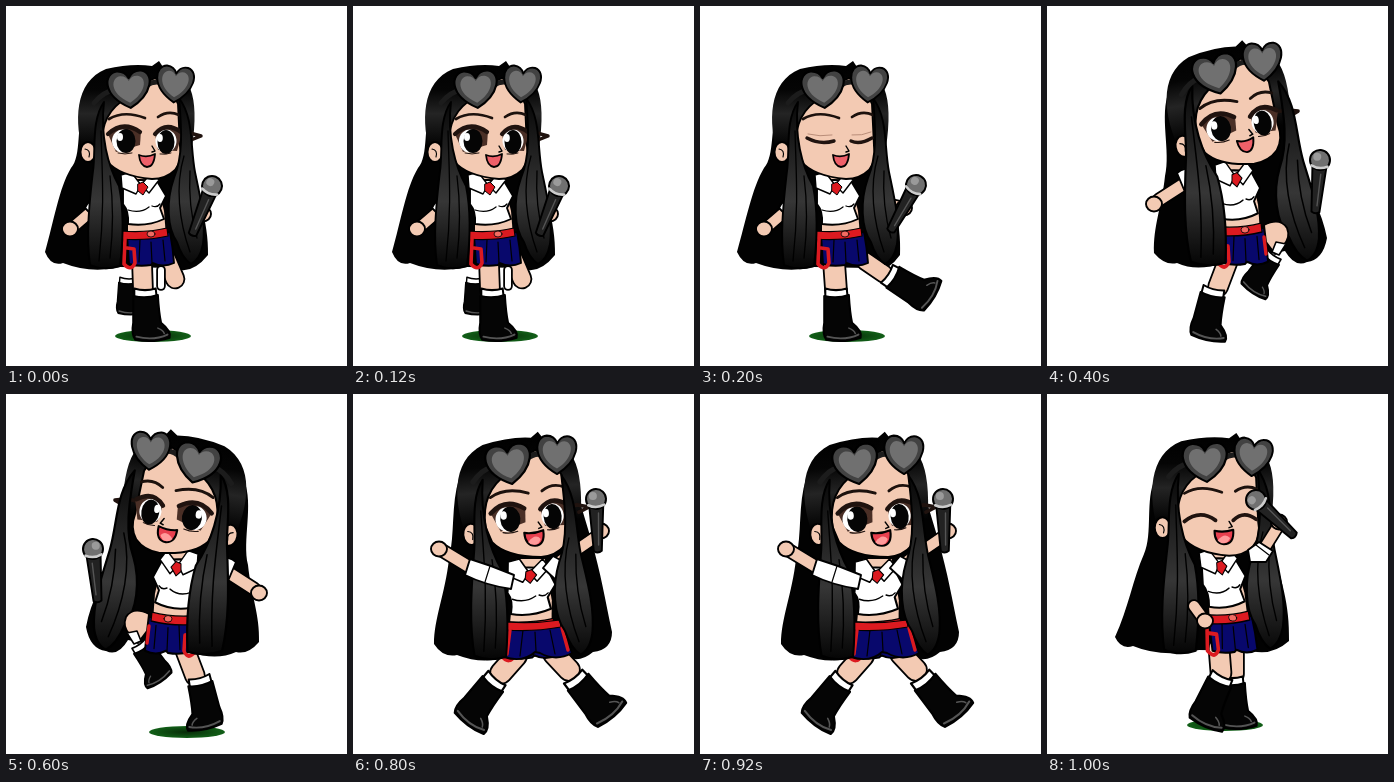
Animation of 341x360 px, one loop 1200 ms. Source, as an HTML page:

```html
<!DOCTYPE html>
<html lang="en">
<head>
<meta charset="utf-8">
<title>Singer dance loop</title>
<style>
html, body { margin: 0; width: 100%; height: 100%; overflow: hidden; background: #fff; }
svg { display: block; width: 100%; height: 100%; }
</style>
</head>
<body>
<svg id="stage" viewBox="0 0 341 360" stroke-linejoin="round" stroke-linecap="round"></svg>
<script>
const STEP = 200;
const SKIN = '#f3cab3', NAVY = '#08086c', RED = '#dc1a20', WHITE = '#fff', LASH = '#20130f';

const at = (m, s) => `<g transform="${m}">${s}</g>`;
const fill = (d, c, w = 1.9) => `<path d="${d}" fill="${c}" stroke="#000" stroke-width="${w}"/>`;
const flat = (d, c) => `<path d="${d}" fill="${c}"/>`;
const line = (d, w = 1.6, c = '#000') => `<path d="${d}" fill="none" stroke="${c}" stroke-width="${w}"/>`;
const limb = (d, w, c = SKIN) => line(d, w + 3.6) + line(d, w, c);
const disc = (x, y, rx, ry, c, w = 0) =>
  `<ellipse cx="${x}" cy="${y}" rx="${rx}" ry="${ry}" fill="${c}" stroke="#000" stroke-width="${w}"/>`;

const defs = `<defs>
  <linearGradient id="dome" x1="0" y1="56" x2="0" y2="150" gradientUnits="userSpaceOnUse">
    <stop offset="0"/><stop offset=".3" stop-color="#050505"/><stop offset=".55" stop-color="#242424"/><stop offset=".9" stop-color="#020202"/>
  </linearGradient>
  <linearGradient id="lock" x1="0" y1="95" x2="0" y2="262" gradientUnits="userSpaceOnUse">
    <stop offset="0" stop-color="#080808"/><stop offset=".25" stop-color="#1c1c1c"/><stop offset=".6" stop-color="#363636"/><stop offset="1" stop-color="#050505"/>
  </linearGradient>
  <radialGradient id="grass"><stop offset="0" stop-color="#072b08"/><stop offset="1" stop-color="#126018"/></radialGradient>
</defs>`;

const shadow = (x, y) => disc(x, y, 38, 6, 'url(#grass)');

function heart(x, y, sx, sy, turn) {
  const d = 'M1 19C-27 5-23-17-11-18Q-3-18 0-11Q4-19 12-18C25-15 22 6 1 19Z';
  return at(`translate(${x} ${y}) rotate(${turn}) scale(${sx} ${sy})`,
    fill(d, '#424242', 2) + at('scale(.72)', flat(d, '#707070')));
}

const eyes = {
  open: line('M172 128L184 127L195 130L185 134', 3.4, LASH) +
    flat('M102 128Q116 112 135 125L134 139L110 146Z', '#4a2f26') +
    flat('M149 128Q160 113 176 127L171 145L152 144Z', '#4a2f26') +
    disc(117, 135, 11, 11.5, WHITE) + disc(160, 135, 10.5, 11.5, WHITE) +
    disc(120, 135, 9.5, 12, '#050505') + disc(160, 136, 8.5, 12, '#050505') +
    disc(114, 131, 3, 4, WHITE) + disc(154, 132, 2.8, 4, WHITE) +
    line('M102 128Q117 114 134 126', 4.2, LASH) + line('M149 128Q160 115 175 126', 4.2, LASH) +
    line('M112 147Q119 149 126 147M154 148Q160 149 165 147', 1, LASH),
  shut: line('M107 132Q120 139 134 135M151 135Q160 139 172 132', 3.4, LASH) +
    line('M108 128Q120 131 132 129M152 129Q162 130 171 126', 1, '#b98d79'),
  happy: line('M103 140Q118 128 133 139M150 139Q160 129 172 138', 3.6, LASH)
};

const mouths = {
  small: fill('M133 149Q141 152 149 148Q148 161 141 161Q134 160 133 149Z', '#ee6069', 1.8),
  wide: fill('M132 149Q141 151 150 148Q151 162 141 162Q132 161 132 149Z', '#e8404f', 2) +
    flat('M135 158Q142 150 147 156Q145 161 141 161Q137 161 135 158Z', '#ff9a9a')
};

function head(eye, mouth) {
  return flat('M78 150C68 116 68 76 100 63Q126 57 146 60L153 55L157 61Q180 66 186 88Q192 110 184 153L168 160L98 160Z', 'url(#dome)') +
    disc(82, 146, 7.5, 10, SKIN, 1.9) + line('M79 143Q85 144 83 151', 1.1) +
    fill('M96 140C95 118 103 102 121 92Q136 78 149 72Q166 82 172 98L174 140Q177 154 169 164Q160 173 146 173Q113 170 101 155Z', SKIN) +
    eyes[eye] + mouths[mouth] +
    line('M103 113Q118 104 139 112M152 111Q162 104 173 109', 2.7, '#1c110d') +
    line('M146 140L149 145L146 146', 1.4);
}

const glasses = line('M88 97Q97 86 108 84M140 80Q148 74 156 77', 5, '#1c1c1c') +
  heart(123, 83, 1.06, 1, -2) + heart(169, 78, .92, .97, 7);

const locks = fill('M98 96C85 114 90 145 87 165C83 200 80 230 84 259Q98 265 114 260C117 235 118 205 113 180C102 160 94 130 98 96Z', 'url(#lock)') +
  fill('M173 92C176 125 177 150 168 172C160 195 161 222 171 236Q176 252 185 258Q194 254 197 238C200 214 194 190 189 166C184 140 188 112 173 92Z', 'url(#lock)') +
  line('M95 125C96 165 99 200 93 255M104 170Q109 210 104 252M178 150C169 180 173 215 184 246M184 165Q182 200 191 232', 1.3);

// Shirt, bow, belt and shorts
const torso = flat('M122 166L148 166L158 205L160 230L122 230Z', SKIN) +
  fill('M121 229L164 226Q167 242 168 257Q157 262 147 257L145 259Q133 261 123 258Z', NAVY) +
  line('M145 236L146 257M134 234L133 256M157 234L159 255', 1.2) +
  fill('M117 175Q134 173 151 175L160 190L154 202L158 213Q141 221 122 218Q123 205 117 198Z', WHITE) +
  line('M122 204Q134 208 143 201M146 200Q151 202 154 198', 1.3) +
  fill('M115 169L125 166L135 179L130 188L116 182ZM135 179L146 166L153 174L143 187Z', WHITE, 1.4) +
  fill('M132 178L137 176L142 181L137 189L132 185Z', RED, 1) +
  fill('M116 225Q140 227 161 222L162 230Q140 235 116 233Z', RED, 1.2) +
  disc(145, 228, 4, 3, '#f36b62', .8);
const strap = line('M119 232L118 258Q125 266 129 257L128 243L121 242', 3.6, RED);

// Boot with the sock showing above it
const boot = (x, y, turn, k = 1.07) => at(`translate(${x} ${y}) rotate(${turn}) scale(${k})`,
  fill('M-10-7Q0-4 10-7L11 2L-10 2Z', WHITE) +
  fill('M-11 0Q1 3 12-1Q13 16 15 25Q25 33 23 39Q8 44-9 41Q-13 36-11 25Z', '#050505') +
  line('M-8 38Q8 42 21 36', 1.8, '#555') + line('M12 30Q17 32 18 35', 1.4, '#555'));

const mic = (x, y, turn) => at(`translate(${x} ${y}) rotate(${turn})`,
  fill('M-7 7L7 7L4 52Q0 55-4 52Z', '#222') + line('M2 14L1 46', 1.4, '#555') +
  disc(0, 0, 10, 10, '#707070', 2) + disc(-3, -3, 4, 4, '#9a9a9a') +
  line('M-8 6Q0 10 8 6', 2.6, '#ccc'));

const hand = (x, y) => disc(x, y, 8, 7.5, SKIN, 1.9);

const headAt = (x, y, turn, k, s) =>
  at(`translate(${x} ${y}) rotate(${turn}) scale(${k}) translate(-144 -117)`, s);

function figure(p) {
  const put = s => headAt(...p.head, s);
  return flat(p.hair, '#020202') + p.legs +
    at(`matrix(${p.body})`, torso + strap) + (p.hips || '') + p.arms +
    put(head(p.eye, p.mouth)) + at(`matrix(${p.locks})`, locks) + put(glasses) +
    (p.over || '') + mic(...p.mic);
}

const still = '1 0 0 1 0 0';
const sideArm = limb('M88 203L66 222', 10) + hand(64, 223) +
  fill('M94 189Q82 194 79 202L88 211L98 204Z', WHITE);

const stand = {
  head: [144, 117, 0, 1], body: still, locks: still, eye: 'open', mouth: 'small',
  hair: 'M78 100C70 118 76 150 65 162C53 182 48 215 39 246Q45 261 57 257Q85 268 114 261L168 262Q185 270 202 249C203 215 190 185 184 150V105Z',
  legs: boot(121, 277, 4, .75) + limb('M160 252L169 273', 17) + limb('M155 264L155 280', 6, WHITE) +
    limb('M136 256L137 284', 18) + boot(139, 290, 0),
  arms: sideArm + limb('M180 200L196 208', 9) + hand(197, 208),
  mic: [206, 180, 22]
};

const kick = {
  ...stand, eye: 'shut',
  hair: 'M78 100C70 118 75 150 64 162C52 182 46 215 37 246Q44 261 56 257Q85 268 114 261L168 262Q185 270 200 249C202 215 190 185 184 150V105Z',
  legs: limb('M165 255L184 268', 16) + boot(193, 272, -56) +
    limb('M134 256L136 284', 20) + boot(136, 290, 0),
  arms: sideArm + limb('M180 196L202 201', 9) + hand(204, 202),
  mic: [216, 179, 29]
};

const hop = {
  head: [196, 100, -9, 1.05], body: '1 0 0 1.1 53 -27', locks: '1.15 0 .09 1.08 24 -24',
  eye: 'open', mouth: 'small',
  hair: 'M122 85C112 110 124 145 118 170C115 200 106 220 107 247Q118 260 130 257Q150 266 176 257L238 245Q248 262 260 256Q276 254 280 232C275 205 262 185 250 155L236 85Z',
  legs: boot(223, 253, 37, .9) + limb('M182 252L171 281', 18) + boot(165, 289, 15),
  arms: limb('M140 176L112 194', 11) + hand(107, 198) +
    fill('M152 161Q136 161 130 167L138 186L154 180Z', WHITE) +
    limb('M248 178L264 184', 10) + hand(267, 185) + fill('M236 164L252 170L250 182L236 182Z', WHITE),
  over: fill('M217 219Q233 211 240 222Q244 232 236 240L228 248L219 236Z', SKIN) +
    fill('M229 236L239 238L232 249L225 246Z', WHITE, 1.6) + line('M217 231L219 248', 3.4, RED),
  mic: [273, 154, 5]
};

const star = {
  head: [181, 104, -5, 1.06], body: '1.1 0 -.1 1.06 45.5 -11', locks: '1.05 0 .04 1.08 23 -18',
  eye: 'open', mouth: 'wide',
  hair: 'M106 85C98 110 102 140 96 165C92 200 81 225 81 250Q90 264 104 261Q130 271 152 263L212 262Q226 270 240 258Q259 256 259 238C252 205 248 180 238 145L220 85Z',
  legs: limb('M163 262L148 279', 20) + boot(139, 290, 40, 1.12) +
    limb('M201 260L216 276', 20) + boot(225, 289, -37, 1.15),
  hips: fill('M154 233L208 232Q215 246 219 259Q203 268 187 259L182 258Q170 269 151 263Z', NAVY) +
    line('M182 238L183 257M170 236L167 262M197 236L202 260', 1.2) +
    fill('M154 228Q180 230 207 226L208 233Q180 238 153 236Z', RED, 1.2) +
    line('M157 236L154 260M209 234L215 256', 3.4, RED),
  arms: limb('M206 168L244 142', 10) + hand(248, 137) + fill('M190 174L200 162L211 168L203 186Z', WHITE),
  over: limb('M118 174L90 157', 11) + hand(86, 155) +
    fill('M117 165L138 172L161 181L158 195Q132 191 112 181Z', WHITE) + line('M137 172L132 188', 1.2),
  mic: [243, 105, -2]
};

const pose = {
  head: [180, 103.5, 0, 1.04], body: '1 0 .06 1.1 27 -27', locks: '1.05 0 0 1.08 29 -24',
  eye: 'happy', mouth: 'wide',
  hair: 'M108 85C98 105 106 140 97 160C86 185 81 215 68 243Q74 256 86 252Q115 264 152 256L205 257Q225 262 242 247C243 210 234 185 224 150V85Z',
  legs: limb('M187 254L187 280', 18) + boot(185, 290, 0) +
    limb('M172 254L174 279', 19) + boot(172, 288, 27, 1.1),
  arms: '',
  over: limb('M147 212L155 223', 10) + hand(158, 227) +
    limb('M215 158L230 134', 10) + hand(232, 128) +
    fill('M201 156L212 148L226 157L219 168L203 168Z', WHITE) + line('M209 151L222 161', 1.2),
  mic: [209, 106, -47]
};

const scenes = [
  shadow(147, 330) + figure(stand),
  shadow(147, 330) + figure(kick),
  figure(hop),
  shadow(181, 338) + at('matrix(-1 0 0 1 360 1)', figure({ ...hop, mouth: 'wide' })),
  figure(star),
  shadow(178, 331) + figure(pose)
];

const stage = document.getElementById('stage');
stage.innerHTML = defs + scenes.map(s => `<g class="scene" display="none">${s}</g>`).join('');
const groups = [...stage.querySelectorAll('.scene')];
const start = performance.now();
let shown = -1;

function draw() {
  const i = Math.floor((performance.now() - start) / STEP) % groups.length;
  if (i !== shown) {
    groups.forEach((g, n) => g.setAttribute('display', n === i ? 'inline' : 'none'));
    shown = i;
  }
  requestAnimationFrame(draw);
}
draw();
</script>
</body>
</html>
```
